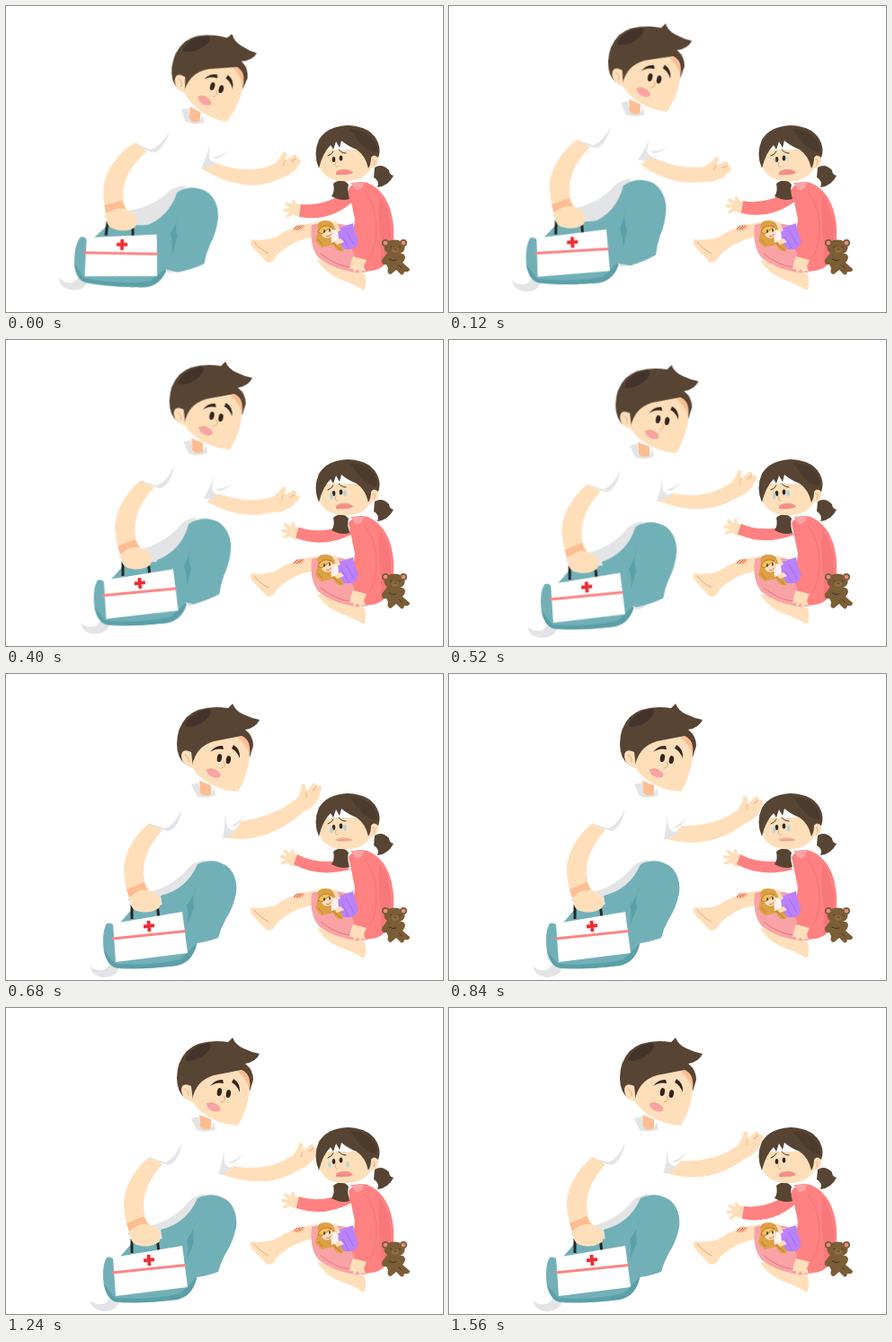
Recreate the animation shown at these times as an HTML page without scripts. Size 486 by 341 pixels, loop 1600 ms.

```html
<!DOCTYPE html>
<html lang="en">
<head>
<meta charset="utf-8">
<title>First aid</title>
<style>
html, body { margin: 0; width: 100%; height: 100%; overflow: hidden; background: #fff; }
svg { display: block; width: 486px; height: 341px; }

.skin { fill: #ffdfba; }
.blush { fill: #fdbd92; }
.hair { fill: #574433; }
.dark { fill: #44332a; }
.ink { fill: #33251c; }
.teal { fill: #72b0b8; }
.fold { fill: #5b9fa8; }
.white { fill: #fff; }
.grey { fill: #e3e4e5; }
.pink { fill: #ff8181; }
.rose { fill: #f9a3a6; }
.line { fill: none; stroke: #44332a; stroke-width: 1.6; stroke-linecap: round; stroke-linejoin: round; }
.thin { stroke-width: 1; }
.crease { stroke: #eda77f; stroke-width: 1; }
.seam { stroke: #ef757a; stroke-width: 1; }

.anim { animation: 1600ms linear infinite; }
.body { animation-name: kneel; transform-origin: 159px 281px; }
.shin { animation-name: shin; transform-origin: 230px 215px; }
.shoe { animation-name: shoe; }
.arm { animation-name: arm; }
.palm { animation-name: palm; }
.sleeve { animation-name: sleeve; transform-origin: 228px 150px; }
.girlArm { animation-name: girlArm; }
.girlHand { animation-name: girlHand; }
.tearL { animation-name: tearL; }
.tearR { animation-name: tearR; }
.mouth { animation-name: mouth; transform-origin: 376px 185px; }

@keyframes kneel {
  0% { transform: translate(-30px, -15px) rotate(7deg); }
  10% { transform: translate(-19px, -18.5px) rotate(1deg); }
  42.5%, 100% { transform: translate(0, 0) rotate(0deg); }
}
@keyframes shin {
  0%, 15% { transform: rotate(-12deg); }
  32.5% { transform: rotate(-6deg); }
  42.5%, 100% { transform: rotate(0deg); }
}
@keyframes shoe { 0%, 32.5% { opacity: 1; } 42.5%, 100% { opacity: 0; } }

/* reach, low, reach, high, touch, rise */
@keyframes arm {
  0% { d: path("M236 173Q284 191 316 171L326 186Q288 211 234 185Z"); }
  15% { d: path("M226 178Q251 203 290 209L289 226Q246 222 222 193Z"); }
  32.5%, 62.5%, 77.5% { d: path("M238 172Q285 187 317 165L328 179Q290 205 236 184Z"); }
  42.5% { d: path("M258 165Q300 158 323 139L335 150Q290 192 242 182Z"); }
  100% { d: path("M247 169Q292 173 320 153L331 165Q289 199 239 183Z"); }
}
@keyframes palm {
  0% { transform: translate(320px, 178px) rotate(-30deg); }
  15% { transform: translate(288px, 218px) rotate(3deg); }
  32.5%, 62.5%, 77.5% { transform: translate(322px, 172px) rotate(-30deg); }
  42.5% { transform: translate(329px, 145px) rotate(-42deg); }
  100% { transform: translate(326px, 158px) rotate(-36deg); }
}
@keyframes sleeve {
  0%, 32.5%, 62.5%, 77.5% { transform: rotate(8deg); }
  15% { transform: rotate(35deg); }
  42.5% { transform: rotate(0deg); }
  100% { transform: rotate(4deg); }
}
@keyframes girlArm {
  0%, 97.5%, 100% { d: path("M328 221Q354 224 383 204L390 214Q362 242 326 235Z"); }
  40%, 60% { d: path("M324 201Q346 213 376 207L382 218Q346 227 320 212Z"); }
}
@keyframes girlHand {
  0%, 97.5%, 100% { transform: translate(320px, 227px) rotate(-4deg); }
  40%, 60% { transform: translate(316px, 206px) rotate(14deg); }
}
@keyframes tearL {
  0%, 4% { transform: translate(363px, 171px); opacity: 0; }
  12%, 45% { transform: translate(362px, 174px); opacity: 1; }
  77% { transform: translate(360px, 174px); opacity: .8; }
  92%, 100% { transform: translate(359px, 177px); opacity: 0; }
}
@keyframes tearR {
  0%, 4% { transform: translate(375px, 169px); opacity: 0; }
  12%, 45% { transform: translate(377px, 171px); opacity: 1; }
  77% { transform: translate(380px, 174px); opacity: .8; }
  92%, 100% { transform: translate(381px, 177px); opacity: 0; }
}
@keyframes mouth {
  0%, 35%, 75%, 100% { transform: scale(1, 1); }
  40%, 70% { transform: scale(.9, .35); }
}
</style>
</head>
<body>
<svg viewBox="0 0 486 341">
  <g class="anim body">
    <!-- back leg -->
    <path class="grey" d="M94 325Q97 331 107 330Q115 328 116 319L126 327Q123 338 108 338Q94 336 94 325Z"/>
    <path class="teal" d="M112 278Q119 276 121 284L140 262Q178 250 205 225L232 246L213 296Q210 320 190 325Q150 330 124 328Q113 326 109 310Q106 288 112 278Z"/>
    <path class="fold" d="M122 327Q113 325 109 308L121 323Q160 326 194 318L212 300Q208 321 190 325Q150 330 122 327Z"/>

    <!-- reaching arm -->
    <path class="skin anim arm" d="M238 172Q285 187 317 165L328 179Q290 205 236 184Z"/>
    <g class="anim palm">
      <path class="skin" d="M-6-7C3-8 8-11 14-16Q18-17 17-12L13-7L25-9Q29-7 26-4Q31-2 28 2Q25 4 22 5Q21 8 17 8Q5 12-3 8Z"/>
      <path class="line crease" d="M13-7Q10-5 9-2M19-3L25-4"/>
    </g>

    <!-- shirt -->
    <path class="white" d="M207 132Q180 140 160 167L183 174L166 237L137 248Q183 241 221 207L238 183L250 153L231 132Z"/>
    <path class="grey" d="M135 252L139 247Q177 243 199 221Q207 209 221 207Q218 240 204 250Q190 258 150 258Z"/>
    <g class="anim sleeve">
      <path class="white" d="M222 140H247L265 157Q259 173 242 184L226 178Z"/>
      <path class="grey" d="M243 156Q244 168 241 184Q251 181 257 174Q249 175 246 170ZM266 156Q259 166 250 169Q257 173 266 156Z"/>
    </g>

    <!-- front leg -->
    <path class="grey anim shoe" d="M210 297H226Q225 305 214 306Q209 304 210 297Z"/>
    <g class="anim shin">
      <path class="teal" d="M172 247Q201 240 213 212Q232 203 248 216Q258 227 256 244Q253 260 244 274Q239 283 236 294Q223 299 206 301L180 292Z"/>
      <path class="fold" d="M213 235Q206 246 209 261L201 281Q204 266 201 258Q207 251 213 235Z"/>
    </g>

    <!-- carrying arm and bag -->
    <path class="skin" d="M160 166C143 178 130 202 131 221Q132 237 138 250L157 239Q144 207 174 174Z"/>
    <path class="grey" d="M160 167L177 172Q188 168 196 150Q192 171 181 175Q168 172 160 167Z"/>
    <path d="M140 273V258Q155 246 168 255L170 273" fill="none" stroke="#252525" stroke-width="3"/>
    <path class="white" d="M119 278L196 265L202 311L122 321Z"/>
    <path d="M118 295L200 286.500" stroke="#fb8585" stroke-width="3.200"/>
    <path d="M153 281.500L165 280.200M158.400 275L159.600 287" stroke="#ee2b32" stroke-width="3.800"/>
    <path class="skin" d="M135 241L154 234Q159 243 169 246Q175 253 170 261Q160 267 150 265Q140 265 138 254Z"/>
    <path class="blush" d="M134 240L153 232L158 241Q148 239 137 249Z"/>

    <!-- head -->
    <path class="grey" d="M206 123L214 121L217 133L228 134L231 127L233 135Q222 140 212 136Z"/>
    <path class="blush" d="M215 119L228 124L228 134Q220 138 216 132Z"/>
    <path class="skin" d="M199 84Q204 106 219 117Q236 130 258 131Q269 113 271 92L273 66L215 64Z"/>
    <path class="hair" d="M200 101Q190 94 190 78Q190 60 201 48Q216 34 247 38L252 33Q255 41 264 45Q272 49 282 51Q278 60 266 62Q275 69 275 80L271 93Q271 77 262 69Q246 72 231 75Q211 81 207 102Z"/>
    <path class="dark" d="M199 58Q205 42 226 39Q230 42 225 48Q215 59 203 59Z"/>
    <path class="blush" d="M262 69Q273 73 271 91Q268 79 258 71Z"/>
    <path class="skin" d="M206 87Q195 82 195 92Q196 102 208 105Z"/>
    <path class="line crease" d="M199 90Q204 92 203 98"/>
    <path class="ink" d="M227 87Q233 79 241 80L242 84Q234 82 227 87ZM253 79Q261 84 260 94Q257 86 251 83Z"/>
    <ellipse class="ink" cx="237.500" cy="93.500" rx="2.600" ry="4.500" transform="rotate(10 237 93)"/>
    <ellipse class="ink" cx="247.500" cy="95.500" rx="2.600" ry="4.500" transform="rotate(10 247 95)"/>
    <path class="line crease" d="M242 98Q246 104 239 105"/>
    <ellipse class="rose" cx="231" cy="110.500" rx="8" ry="4.300" transform="rotate(24 231 110)"/>
    <path class="line crease" d="M223 107Q231 103 238 112"/>
  </g>

  <g>
    <!-- girl's legs and dress -->
    <path class="skin" d="M346 283Q356 300 378 307Q390 312 398 317Q402 309 399 299L365 286Z"/>
    <path class="skin" d="M346 241Q319 244 299 258Q286 262 273 260Q269 264 277 272Q287 282 289 285Q297 288 301 278Q320 260 345 257Z"/>
    <path class="line crease" d="M276 263Q282 271 292 276"/>
    <ellipse class="blush" cx="326" cy="247" rx="6.500" ry="3" transform="rotate(-15 326 247)"/>
    <path d="M320 249L324 245M323 249L327 245M326 248.500L330 244.500" stroke="#d7605c"/>
    <path class="rose" d="M340 244Q360 237 390 248L418 286Q407 299 387 297Q362 292 348 281Q337 268 340 244Z"/>
    <path class="pink" d="M381 204Q388 193 402 197Q423 206 429 233Q435 260 425 282Q418 297 398 295L384 270L388 238Z"/>
    <path d="M415 211Q428 228 428 257Q428 280 416 290Q419 264 414 242Z" fill="#f7777a"/>
    <path class="line seam" d="M350 276Q367 290 383 291"/>

    <!-- girl's reaching arm -->
    <g class="anim girlHand">
      <path class="skin" d="M9-6L4-6L1-11Q-2-12-1-8L-1-6L-8-9Q-11-8-8-5L-4-2L-11-2Q-13 1-9 2L-4 2L-9 6Q-10 9-6 8L-1 5Q4 9 9 7Z"/>
    </g>
    <path class="pink anim girlArm" d="M328 221Q354 224 383 204L390 214Q362 242 326 235Z"/>

    <!-- doll -->
    <path d="M347 250Q344 239 355 239Q367 239 366 252Q371 260 377 263L375 273Q367 275 364 266L351 269L344 262Z" fill="#dda044"/>
    <path d="M369 248L386 242Q388 256 394 264Q387 273 376 271Q371 262 365 261Z" fill="#b982fa"/>
    <path d="M378 250L387 266M374 257L381 270" stroke="#a46fe8"/>
    <path d="M361 250L369 249L370 261L362 264Z" fill="#fff4f3"/>
    <ellipse class="skin" cx="357" cy="252" rx="7" ry="6.500" transform="rotate(25 357 252)"/>
    <path d="M347 252Q351 242 362 246L351 254ZM363 264L373 272M347 260L352 266" fill="#f2c05e" stroke="#bd7a2c"/>
    <path class="line" d="M354 250V252M360 249V251"/>
    <path d="M356 256Q360 258 361 254" fill="none" stroke="#dd6e6a"/>
    <path class="skin" d="M363 241L367 240L372 250L368 252ZM365 262L372 259L376 263L368 266Z"/>

    <!-- resting arm -->
    <path class="pink" d="M392 204Q406 199 412 218Q418 239 413 264Q410 278 402 285L386 280Q394 262 393 237Z"/>
    <path class="line seam" d="M399 207Q413 224 412 253Q411 271 404 281"/>
    <path class="skin" d="M386 279L401 283L398 290L400 296L396 295L394 298L391 293L387 298L386 293L382 293Q383 286 386 279Z"/>
    <path class="rose" d="M383 197L398 196Q397 206 389 205Z"/>

    <!-- girl's head -->
    <path class="hair" d="M364 198Q374 190 381 199Q379 205 382 215Q373 218 362 212Q366 207 364 198Z"/>
    <path class="hair" d="M410 180Q418 175 426 183Q426 188 431 189Q425 201 413 202Q416 195 409 191Z"/>
    <path class="skin" d="M348 160H411Q415 167 414 173Q413 180 406 181Q398 194 382 195Q356 197 349 180Z"/>
    <path class="hair" d="M348 181Q341 165 348 149Q357 134 380 133Q407 134 414 153Q417 161 414 169Q409 164 406 169Q406 176 403 181Q400 167 390 160Q380 156 373 150L371 158L367 151L364 160L361 155Q352 164 348 181Z"/>
    <path class="dark" d="M382 137Q401 137 410 151Q414 158 412 163Q400 161 392 150Q387 142 382 137Z" opacity=".6"/>
    <path class="line crease" d="M408 171Q412 171 409 177"/>
    <path class="line thin" d="M358 167Q362 166 364 162M370 160Q373 164 378 164"/>
    <ellipse class="ink" cx="364.500" cy="171" rx="1.800" ry="3"/>
    <ellipse class="ink" cx="372.500" cy="169.500" rx="1.800" ry="3"/>
    <path class="line crease" d="M367 174Q364 179 369 179"/>
    <path class="anim mouth" d="M367 188Q366 183 374 182Q383 181 386 186Q380 189 367 188Z" fill="#f58c8b"/>
    <path class="line crease" d="M367 185Q375 180 385 185"/>
    <ellipse class="anim tearL" rx="1.800" ry="3.500" fill="#a9d6dd"/>
    <ellipse class="anim tearR" rx="1.800" ry="3.500" fill="#a9d6dd"/>

    <!-- teddy -->
    <g fill="#7b5d36">
      <circle cx="422" cy="264" r="4"/>
      <circle cx="442" cy="264" r="4"/>
      <ellipse cx="432" cy="269" rx="11.500" ry="8.500"/>
      <path d="M424 275L418 283Q417 289 423 288L425 292Q423 299 428 299L434 294L439 299Q442 301 443 296Q449 297 449 293L441 286Q447 279 441 276Z"/>
    </g>
    <circle cx="422" cy="264" r="2.300" fill="#e88d83"/>
    <circle cx="442" cy="264" r="2.300" fill="#e88d83"/>
    <ellipse cx="433" cy="272" rx="4" ry="3" fill="#8f6d40"/>
    <path class="line thin" d="M428 268V269M438 268V269M432 271H434M426 282Q430 285 434 283M437 289L440 292"/>
  </g>
</svg>
</body>
</html>
```
